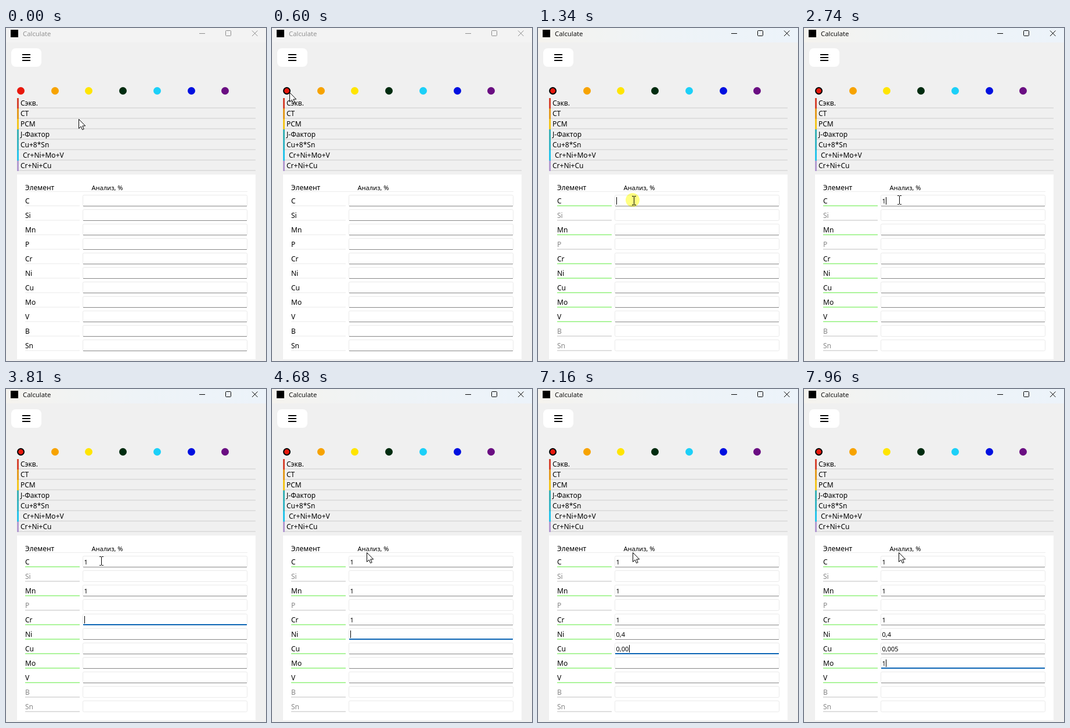
An HTML page with a canvas that plays this animation: 448 by 575 pixels, repeating every 8000 ms.

```html
<!DOCTYPE html>
<html lang="ru">
<head>
<meta charset="utf-8">
<title>Calculate</title>
<style>
  html, body { margin: 0; width: 100%; height: 100%; overflow: hidden; background: #f0f0f0; }
  canvas { display: block; }
</style>
</head>
<body>
<canvas id="stage" width="448" height="575"></canvas>
<script>
const ctx = document.getElementById('stage').getContext('2d');
const LOOP = 8000, BLINK = 530;
const HOVER_AT = 500, SELECT_AT = 740;

const indicators = [
  ['Сэкв.', '#e8180c', '#d6432f'],
  ['СТ', '#f7a300', '#e39a1d'],
  ['РСМ', '#ffe500', '#f3c41c'],
  ['J-Фактор', '#002c10', '#38b0b4'],
  ['Cu+8*Sn', '#1cd0f8', '#35b4c4'],
  ['Cr+Ni+Mo+V', '#0010e0', '#25c3ea'],
  ['Cr+Ni+Cu', '#6a0e82', '#b29ad0'],
];
const elements = ['C', 'Si', 'Mn', 'P', 'Cr', 'Ni', 'Cu', 'Mo', 'V', 'B', 'Sn'];
const unused = ['Si', 'P', 'B', 'Sn'];

// [time, row, text in that field]; an empty text moves the focus there
const edits = [
  [1340, 0, ''], [2740, 0, '1'],
  [3220, 2, ''], [3480, 2, '1'],
  [3810, 4, ''], [4010, 4, '1'],
  [4680, 5, ''], [4950, 5, '0'], [5150, 5, '0,'], [5560, 5, '0,4'],
  [5960, 6, ''], [6360, 6, '0'], [6830, 6, '0,'], [7030, 6, '0,0'], [7160, 6, '0,00'], [7300, 6, '0,005'],
  [7560, 7, ''], [7960, 7, '1'],
];

// Pointer stops: [departure, arrival, x, y]
const stops = [
  [0, 0, 125, 157],
  [70, 560, 30, 111],
  [890, 1300, 165, 298],
  [2270, 2270, 164, 298],
  [2670, 2670, 164, 297],
  [4210, 4210, 163, 283],
  [4280, 4280, 163, 282],
];
const clicks = [[670, 800], [1330, 1395]];

function rect(x, y, w, h, color) {
  ctx.fillStyle = color;
  ctx.fillRect(x, y, w, h);
}
function roundRect(x, y, w, h, r) {
  ctx.beginPath();
  ctx.roundRect(x, y, w, h, r);
}
function disc(x, y, r, color) {
  ctx.fillStyle = color;
  ctx.beginPath();
  ctx.arc(x, y, r, 0, 7);
  ctx.fill();
}
function text(str, x, y, size = 12, color = '#000', family = '"Noto Sans"') {
  ctx.font = `${size}px ${family}, sans-serif`;
  ctx.fillStyle = color;
  ctx.fillText(str, x, y);
}
function strokePath(d, color, width = 1) {
  ctx.strokeStyle = color;
  ctx.lineWidth = width;
  ctx.stroke(new Path2D(d));
}

function drawTitleBar(active) {
  const bar = ctx.createLinearGradient(0, 0, 448, 0);
  bar.addColorStop(0, active ? '#f5f3ee' : '#f3f3f3');
  bar.addColorStop(0.5, active ? '#eef3f7' : '#f3f3f3');
  bar.addColorStop(1, active ? '#ecf3fa' : '#f3f3f3');
  rect(0, 0, 448, 25, bar);
  rect(8, 3, 13, 13, '#000');
  const ink = active ? '#000' : '#8c8c8c';
  text('Calculate', 29, 14, 11.4, ink, '"Open Sans"');
  strokePath('M333 9.5h10M424 4.5l9.5 9.5M433.5 4.5l-9.5 9.5', ink);
  roundRect(378.5, 4.5, 9, 9, 1);
  ctx.stroke();
}

function drawMenuButton() {
  ctx.fillStyle = '#fff';
  roundRect(9, 35, 52, 32, 8);
  ctx.fill();
  for (const y of [45, 50, 55]) rect(28, y, 14, 2, '#000');
}

function drawIndicators(ringed) {
  indicators.forEach(([label, dot, bar], i) => {
    const x = Math.round(25 + i * 58.7) + 0.5, y = 121 + i * 18;
    if (i === 0 && ringed) disc(x, 108.5, 6.5, '#000');
    disc(x, 108.5, i === 0 && ringed ? 4.4 : 6.5, dot);
    rect(22, y + 16, 408, 2, '#dedede');
    rect(19, y, 3, 18, bar);
    text(label, i === 5 ? 29 : 25, y + 13);
  });
}

function drawField(row, selected, value, focused, caretOn) {
  const y = 288 + row * 25, name = elements[row];
  const disabled = selected && unused.includes(name);
  text(name, 33, y + 15, 12, disabled ? '#868686' : '#000');
  rect(33, y + 18, 94, 2, !selected ? '#f4f4f4' : disabled ? '#dedede' : '#acf59b');

  ctx.strokeStyle = '#e9e9e9';
  ctx.lineWidth = 1;
  roundRect(132.5, y + 0.5, 283, 19, 2);
  ctx.stroke();
  if (focused && row > 0) rect(133, y + 18, 282, 2, '#0a64b4');
  else if (!disabled) rect(133, y + 19, 282, 1, '#868686');

  text(value, 134.5, y + 15, 11);
  if (focused && caretOn) rect(135 + Math.round(ctx.measureText(value).width), y + 4, 1, 13, '#000');
}

function drawPanel(t, selected) {
  rect(19, 253, 411, 319, '#fff');
  text('Элемент', 33, 280);
  text('Анализ, %', 147.5, 280, 11);
  rect(33, 282, 383, 1, '#ececec');

  const done = edits.filter(([at]) => at <= t);
  const values = {};
  for (const [, row, value] of done) values[row] = value;
  const [lastAt, focus] = done.at(-1) || [0, -1];
  const caretOn = Math.floor((t - lastAt) / BLINK) % 2 === 0;
  elements.forEach((_, row) => drawField(row, selected, values[row] || '', row === focus, caretOn));
}

function pointerAt(t) {
  let [, , x, y] = stops[0];
  for (const [from, to, toX, toY] of stops) {
    if (t < from) break;
    const p = to > from ? Math.min(1, (t - from) / (to - from)) : 1;
    const eased = p * p * (3 - 2 * p);
    x += (toX - x) * eased;
    y += (toY - y) * eased;
  }
  return [Math.round(x), Math.round(y)];
}

function drawPointer(t) {
  const [x, y] = pointerAt(t);
  if (clicks.some(([from, to]) => t >= from && t < to)) {
    ctx.globalCompositeOperation = 'multiply';
    disc(x - 2, y - 1, 12, '#ffff80');
    ctx.globalCompositeOperation = 'source-over';
  }
  ctx.save();
  ctx.translate(x, y);
  if (x > 132 && y >= 288 && y < 308) {
    strokePath('M-3 -7.5h3M1 -7.5h3M-3 7.5h3M1 7.5h3M.5 -7V7', '#000');
  } else {
    const arrow = 'M.5 .5V16.5L4.2 13L6.6 18.6L9.2 17.5L6.8 12H11.7Z';
    ctx.fillStyle = '#fff';
    ctx.fill(new Path2D(arrow));
    strokePath(arrow, '#000');
  }
  ctx.restore();
}

function draw() {
  const t = (performance.now() + 8) % LOOP;
  const selected = t >= SELECT_AT;
  rect(0, 0, 448, 575, '#f0f0f0');
  drawTitleBar(selected);
  drawMenuButton();
  drawIndicators(t >= HOVER_AT);
  drawPanel(t, selected);
  drawPointer(t);
  requestAnimationFrame(draw);
}
draw();
</script>
</body>
</html>
```
